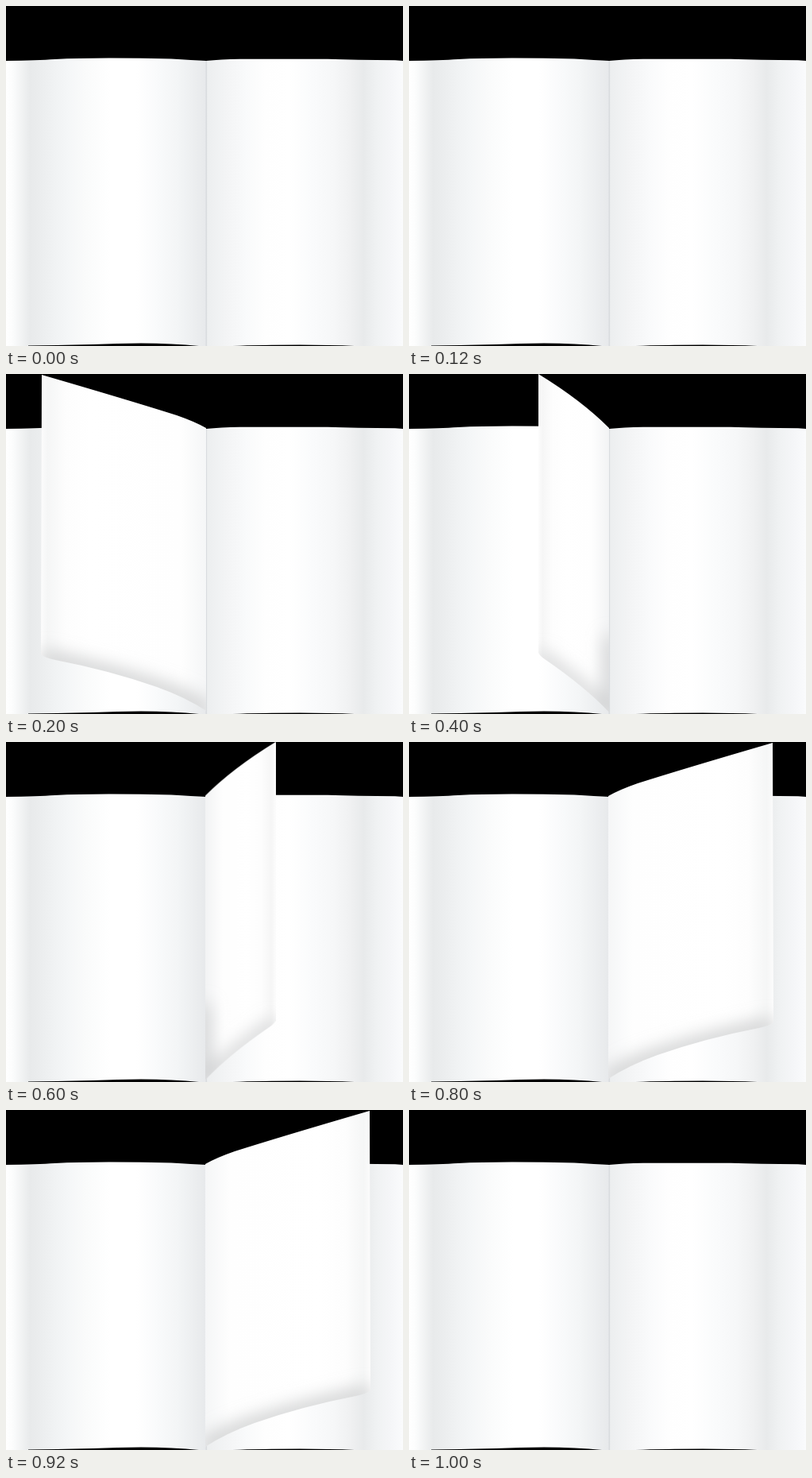
An HTML page for the animation above (1200 ms loop, 500x428 px).

```html
<!DOCTYPE html>
<html lang="en">
<head>
<meta charset="utf-8">
<title>Turning page</title>
<style>
  html, body { margin: 0; width: 100%; height: 100%; overflow: hidden; background: #000; }
  svg { display: block; width: 100vw; height: 100vh; }
  .pose { opacity: 0; animation: show 1200ms step-end infinite; animation-delay: calc(var(--n) * 200ms - 1200ms); }
  @keyframes show {
    0% { opacity: 1; }
    16.6667%, 100% { opacity: 0; }
  }
</style>
</head>
<body>
<svg viewBox="0 0 500 428" preserveAspectRatio="none">
  <defs>
    <linearGradient id="left" gradientUnits="userSpaceOnUse" x1="0" x2="252">
      <stop offset="0" stop-color="#fff"/>
      <stop offset=".03" stop-color="#fcfdfd"/>
      <stop offset=".12" stop-color="#e8eaeb"/>
      <stop offset=".18" stop-color="#eceeef"/>
      <stop offset=".3" stop-color="#f4f6f7"/>
      <stop offset=".4" stop-color="#fafbfb"/>
      <stop offset=".52" stop-color="#fff"/>
      <stop offset=".65" stop-color="#fff"/>
      <stop offset=".76" stop-color="#f9fafb"/>
      <stop offset=".86" stop-color="#f3f5f6"/>
      <stop offset="1" stop-color="#e7e9eb"/>
    </linearGradient>
    <linearGradient id="right" gradientUnits="userSpaceOnUse" x1="252" x2="500">
      <stop offset="0" stop-color="#eceeef"/>
      <stop offset=".1" stop-color="#f3f4f5"/>
      <stop offset=".2" stop-color="#f9fafb"/>
      <stop offset=".3" stop-color="#fefefe"/>
      <stop offset=".42" stop-color="#fff"/>
      <stop offset=".54" stop-color="#fafbfc"/>
      <stop offset=".65" stop-color="#f6f7f8"/>
      <stop offset=".73" stop-color="#f0f1f2"/>
      <stop offset=".8" stop-color="#e8eaeb"/>
      <stop offset=".87" stop-color="#f0f2f3"/>
      <stop offset=".94" stop-color="#f5f6f8"/>
      <stop offset="1" stop-color="#fafbfc"/>
    </linearGradient>
    <linearGradient id="wideFill" gradientUnits="userSpaceOnUse" x1="44" x2="252">
      <stop offset="0" stop-color="#fcfcfc"/>
      <stop offset=".04" stop-color="#f5f6f6"/>
      <stop offset=".15" stop-color="#fdfdfd"/>
      <stop offset=".3" stop-color="#fff"/>
      <stop offset=".85" stop-color="#fefefe"/>
      <stop offset="1" stop-color="#f5f6f7"/>
    </linearGradient>
    <linearGradient id="thinFill" gradientUnits="userSpaceOnUse" x1="163" x2="252">
      <stop offset="0" stop-color="#fcfcfc"/>
      <stop offset=".06" stop-color="#f6f6f6"/>
      <stop offset=".2" stop-color="#fdfdfd"/>
      <stop offset=".4" stop-color="#fff"/>
      <stop offset=".75" stop-color="#fefefe"/>
      <stop offset="1" stop-color="#f2f3f4"/>
    </linearGradient>
    <filter id="soft" filterUnits="userSpaceOnUse" x="0" y="0" width="500" height="470">
      <feGaussianBlur stdDeviation="11"/>
    </filter>
    <path id="wide" d="M45 1Q155 33 215 52Q238 60 252 68V424Q226 407 190 394Q130 373 62 360Q48 357 44 353Z"/>
    <path id="thin" d="M163 0Q217 33 252 68V426Q222 394 171 359Q165 355 163 351Z"/>
    <clipPath id="wideClip"><use href="#wide"/></clipPath>
    <clipPath id="thinClip"><use href="#thin"/></clipPath>
    <g id="widePage">
      <use href="#wide" fill="url(#wideFill)"/>
      <g clip-path="url(#wideClip)">
        <path d="M44 357Q60 360 100 370T190 396T254 428" fill="none" stroke="#c9cacb" stroke-width="18" filter="url(#soft)"/>
      </g>
    </g>
    <g id="thinPage">
      <use href="#thin" fill="url(#thinFill)"/>
      <g clip-path="url(#thinClip)">
        <path d="M163 354Q222 396 254 428V330" fill="none" stroke="#cbcccd" stroke-width="14" filter="url(#soft)"/>
      </g>
    </g>
  </defs>

  <rect width="500" height="428"/>
  <path fill="url(#left)" d="M0 69Q40 68.5 62 67Q90 65.5 130 65.5T208 66.5Q235 68 252 69V428H243Q210 424.5 170 424.5Q140 424.5 110 426Q60 427 28 427.5V428H0Z"/>
  <path fill="url(#right)" d="M252 69Q270 67 295 66.7H405Q440 68 490 68.2L500 69V428H439Q410 426.5 370 426.5Q320 426.5 285 428H252Z"/>
  <path d="M252.3 69V428" stroke="#d9dcdf" stroke-width="1.6"/>

  <use class="pose" style="--n:1" href="#widePage"/>
  <use class="pose" style="--n:2" href="#thinPage"/>
  <use class="pose" style="--n:3" href="#thinPage" transform="translate(502.5 0) scale(-1 1)"/>
  <use class="pose" style="--n:4" href="#widePage" transform="translate(503 0) scale(-1 1)"/>
</svg>
</body>
</html>
```
